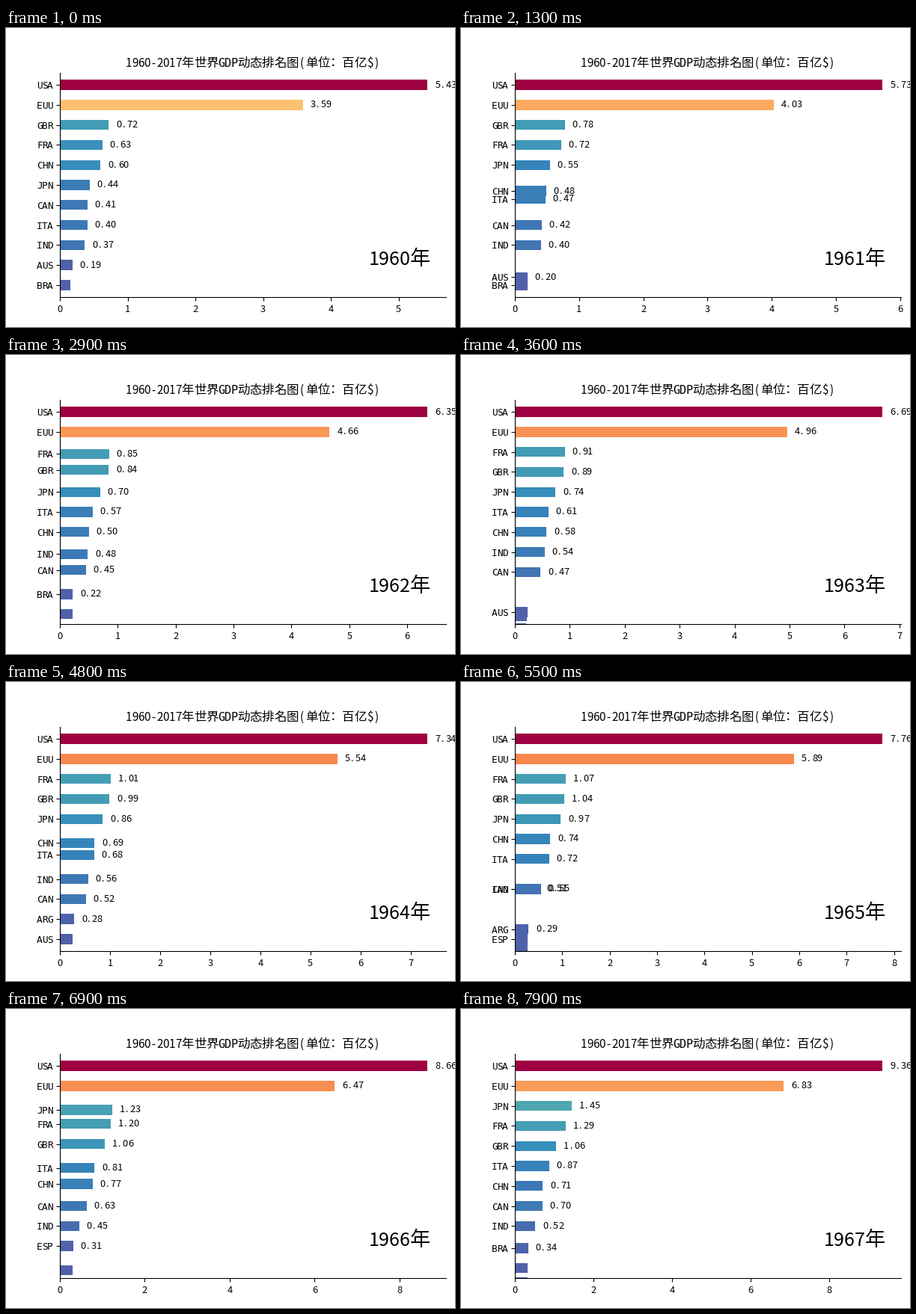
A matplotlib script for the animation above (8 s loop, 600 px wide and 400 px high).

```python
import matplotlib.pyplot as plt
import numpy as np
from matplotlib.animation import FuncAnimation
from matplotlib.transforms import IdentityTransform

W, H, DPI = 600, 400, 100
STEPS, FIRST_YEAR, SPAN = 10, 1960, 8
X0, WIDTH, Y0, ROW = 72, 516, 76.07, 300 / 11.2
CJK, MONO = "Noto Sans CJK JP", "DejaVu Sans Mono"
NUDGE = {".": -0.1, "：": -0.25}

years = np.arange(SPAN + 1)


def growth(start, end, ease=1, *swings, debut=0):
    """Eased growth plus temporary swings, each given as (size, centre year)."""
    v = start + (end - start) * (years / SPAN) ** ease
    for size, centre in swings:
        v += size * np.exp(-(((years - centre) / 1.5) ** 2))
    return np.where(years < debut, np.nan, v)


GDP = {
    "USA": growth(5.43, 9.43, 1.45),
    "EUU": growth(3.59, 6.84, 1.1, (0.18, 6)),
    "GBR": growth(0.723, 1.045, 1, (0.11, 5.7)),
    "FRA": growth(0.627, 1.298, 1.1),
    "CHN": growth(0.63, 0.675, 1, (-0.21, 2.05), (0.12, 6.3)),
    "JPN": growth(0.43, 1.47, 1.8, (0.12, 2.3)),
    "CAN": growth(0.408, 0.707, 2),
    "ITA": growth(0.404, 0.88, 1.06),
    "IND": growth(0.37, 0.555, 1, (0.15, 4.6), (-0.12, 6.2)),
    "AUS": growth(0.186, 0.327, 1.44),
    "BRA": growth(0.152, 0.341, 1.5, (0.05, 2.2), (-0.03, 4.5)),
    "ARG": growth(0.47, 0.226, 1, (-0.198, 2.8), debut=2),
    "ESP": growth(0.12, 0.302, 1, (0.04, 6.6)),
    "MEX": growth(0.13, 0.298, 1.3),
}
CODES = list(GDP)
VALUES = np.array(list(GDP.values())).T
RANKS = np.argsort(np.argsort(-np.nan_to_num(VALUES), axis=1), axis=1)

plt.rcParams["font.family"] = [CJK]
fig = plt.figure(figsize=(W / DPI, H / DPI), dpi=DPI, facecolor="white")
ax = fig.add_axes([0.12, 0.1, 0.86, 0.75])
ax.spines[["top", "right"]].set_visible(False)
ax.tick_params(axis="y", labelleft=False)
ax.tick_params(axis="x", labelsize=9.2)
cmap = plt.get_cmap("Spectral_r")


class CellText:
    """Text on a grid: half an em per Latin sign, one em per ideograph."""

    def __init__(self, count, size):
        self.size = size
        self.glyphs = [
            fig.text(0, 0, "", transform=IdentityTransform(), ha="center", va="baseline")
            for _ in range(count)
        ]

    def place(self, x, base, text):
        em = self.size * DPI / 72
        for glyph, ch in zip(self.glyphs, text):
            wide = ord(ch) > 0x2E7F
            mono = "A" <= ch <= "Z" or ch == "-"
            cell = em if wide else em / 2
            glyph.set(
                text=ch,
                x=x + cell / 2 + NUDGE.get(ch, 0) * em,
                y=H - base,
                fontfamily=MONO if mono else CJK,
                fontsize=self.size * (1 if wide else 0.92),
                visible=True,
            )
            x += cell

    def hide(self):
        for glyph in self.glyphs:
            glyph.set_visible(False)


TITLE = "1960-2017年世界GDP动态排名图(单位：百亿$)"
CellText(len(TITLE), 11.9).place(160, 52, TITLE)
year_text = CellText(5, 19.6)

bars = ax.barh(range(len(CODES)), [0] * len(CODES), height=0.5)
names = [CellText(3, 10) for _ in CODES]
labels = [CellText(4, 10) for _ in CODES]
ax.set_ylim(10.6, -0.6)


def draw(frame):
    i, step = divmod(frame, STEPS)
    t = step / STEPS
    values = VALUES[i] + (VALUES[i + 1] - VALUES[i]) * t
    ranks = RANKS[i] + (RANKS[i + 1] - RANKS[i]) * t
    top = np.nanmax(values)
    ax.set_xlim(0, top * 1.05)
    ticks = []

    for code, v, r, bar, name, label in zip(CODES, values, ranks, bars, names, labels):
        name.hide()
        label.hide()
        shown = bool(np.isfinite(v)) and r < 11
        bar.set_visible(shown)
        if not shown:
            continue
        bar.set(width=v, y=r - 0.25, facecolor=cmap(v / top))
        y = Y0 + r * ROW
        if r < 10.01:
            ticks.append(r)
            name.place(41.5, y + 5, code)
        if r < 9.69:
            label.place(X0 + WIDTH * v / (top * 1.05) + 10, y + 3.5, f"{v:.2f}")

    ax.set_yticks(ticks)
    year_text.place(484.8, 317, f"{FIRST_YEAR + i}年")
    return []


anim = FuncAnimation(fig, draw, frames=SPAN * STEPS, interval=100, repeat=True)
plt.show()
```
